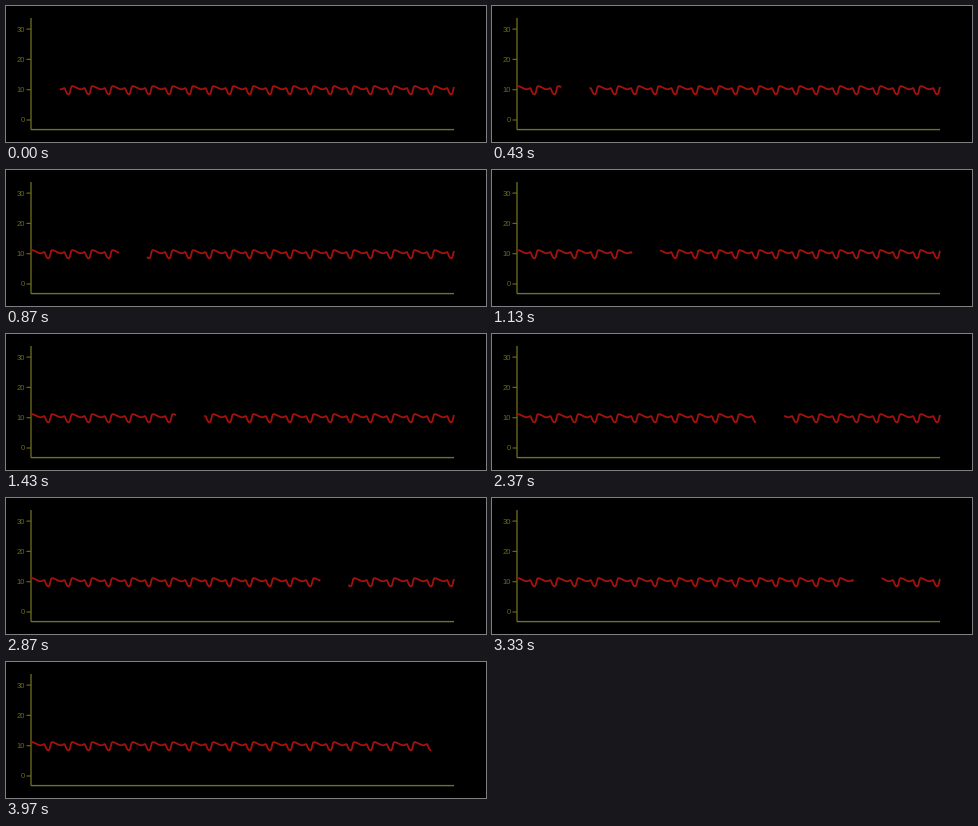
These frames come from a looping animation (480x136 px, 4010 ms). A matplotlib script:

```python
import numpy as np
import matplotlib.pyplot as plt
from matplotlib.animation import FuncAnimation

W, H, DPI = 480, 136, 80
PX = 72 / DPI
LOOP, TICK = 4010, 10
LEFT, RIGHT, TOP, BASE = 25, 448, 12, 123.6
COUNT = 126
STEP = (RIGHT - LEFT) / COUNT
GAP = 8.6
OLIVE, GREY, RED = "#66661c", "#6e6e3c", "#a3120c"
# One beat, two values per step
BEAT = np.array([10.9, 11.15, 10.95, 10.7, 10.4, 10.2, 10.15, 10.3, 10.5, 9.2, 8.5, 8.8])


def y_px(value):
    return 114 - 3.03 * value


def wave(s):
    """Smooth repeating curve through the beat values."""
    i = np.floor(2 * s).astype(int)
    f = 2 * s - i
    a, b, c, d = (BEAT[(i + k) % len(BEAT)] for k in (-1, 0, 1, 2))
    return b + f * ((c - a) + f * (2 * a - 5 * b + 4 * c - d + f * (3 * (b - c) + d - a))) / 2


def trace(start, end):
    if end - start < 0.3:
        return [], []
    s = np.linspace(start, end, max(2, int((end - start) * 6)))
    return LEFT + s * STEP, y_px(wave(s))


fig = plt.figure(figsize=(W / DPI, H / DPI), dpi=DPI, facecolor="black")
ax = fig.add_axes([0, 0, 1, 1])
ax.set(xlim=(0, W), ylim=(H, 0))
ax.axis("off")


def rule(x, y, color, width):
    ax.plot(x, y, color=color, lw=width * PX, solid_capstyle="butt", snap=False)


# Axes, ticks and labels
rule([LEFT, LEFT], [TOP, BASE], OLIVE, 1.4)
rule([LEFT, RIGHT], [BASE, BASE], GREY, 1.4)
for value in (0, 10, 20, 30):
    y = y_px(value)
    rule([20.5, LEFT], [y, y], OLIVE, 1.2)
    ax.text(19, y, str(value), color="#6a6a1c", size=7.6 * PX, ha="right",
            va="center_baseline", family="Liberation Sans")

style = dict(color=RED, lw=1.8 * PX, solid_capstyle="butt", solid_joinstyle="round")
fresh, = ax.plot([], [], **style)
old, = ax.plot([], [], **style)


def update(n):
    # The sweep advances 30 times a second, on a 10 ms clock
    k = min(int((n * TICK + 5) * 0.03), 119)
    fresh.set_data(*trace(0, k + 0.2))
    old.set_data(*trace(k + GAP, COUNT))
    return fresh, old


anim = FuncAnimation(fig, update, frames=LOOP // TICK, interval=TICK,
                     repeat=True, repeat_delay=0, blit=False)
plt.show()
```
